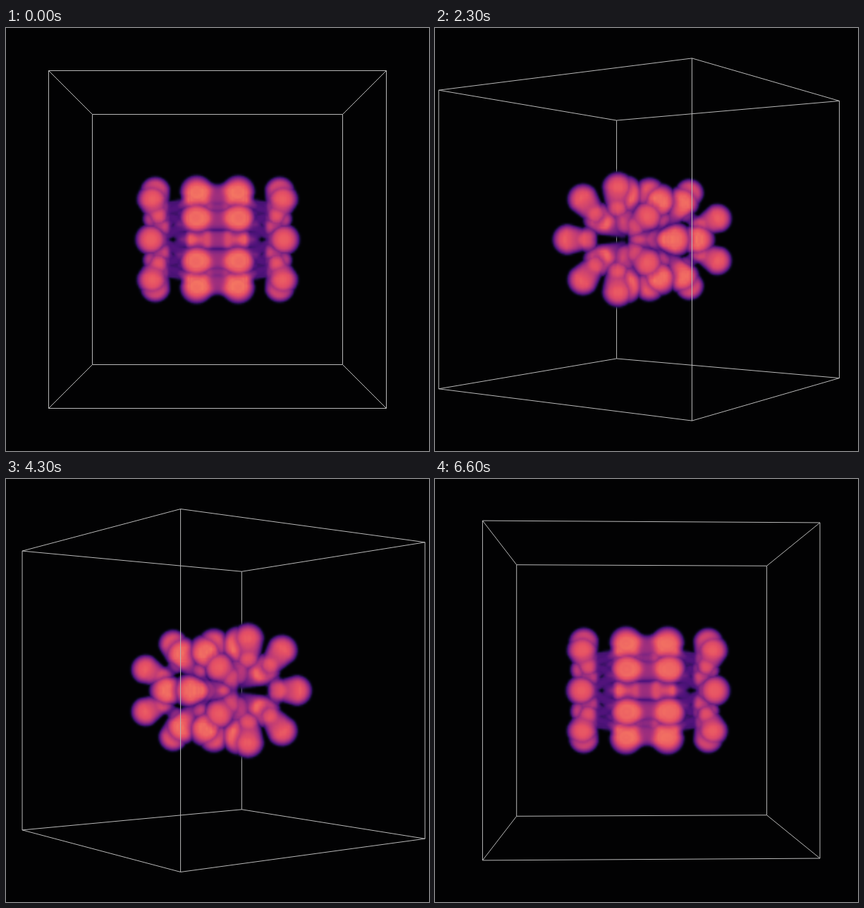
Recreate the animation shown at these times as an HTML page with a canvas. Size 600 by 600 pixels, loop 6700 ms.

```html
<!DOCTYPE html>
<html lang="en">
<head>
<meta charset="utf-8">
<title>Rotating volume</title>
<style>
html, body { margin: 0; width: 100%; height: 100%; overflow: hidden; background: #020203; }
canvas { display: block; }
</style>
</head>
<body>
<canvas id="stage" width="600" height="600"></canvas>
<script>
const ctx = document.getElementById('stage').getContext('2d');
const FRAMES = 67, STEP_MS = 100, TURN = -5.425 * Math.PI / 180;
const DIST = 6.726, FOCAL = 1371.4;   // camera, in half box widths
const A = Math.PI / 7;                // half the angle between neighbouring lobes

// Tapered capsules inside one wedge; points are [x, radius, angle].
const capsule = (p, q, r0, r1, v0, v1) => {
  const at = ([x, r, t]) => [x, r * Math.cos(t), r * Math.sin(t)];
  const a = at(p), b = at(q), d = b.map((v, i) => v - a[i]);
  return { a, d, len: d[0] ** 2 + d[1] ** 2 + d[2] ** 2, r0, r1, v0, v1 };
};
const outerArm = t => capsule([.41, .2, t], [.437, .345, t], .075, .103, .52, .82);
const innerArm = t => capsule([.125, .13, t], [.143, .335, t], .06, .112, .35, .82);
const wisp = t => capsule([.42, .22, t], [.17, .26, A], .05, .055, .36, .36);
const parts = [
  outerArm(0), outerArm(2 * A), innerArm(A), innerArm(-A),
  capsule([.4, .21, 0], [.4, .21, 2 * A], .055, .055, .4, .4),
  capsule([0, .31, A], [.145, .31, A], .085, .09, .55, .55),
  wisp(0), wisp(2 * A)
];
const FLOOR = .13;                    // density that stays invisible

// Sevenfold symmetry about x, mirrored left to right.
function density(x, y, z) {
  const rho = Math.hypot(y, z);
  let t = Math.abs(Math.atan2(y, z)) % (2 * A);
  if (t > A) t = 2 * A - t;
  x = Math.abs(x);
  const u = rho * Math.cos(t), w = rho * Math.sin(t);
  let sum = 0;
  for (const { a, d, len, r0, r1, v0, v1 } of parts) {
    const px = x - a[0], pu = u - a[1], pw = w - a[2];
    const k = Math.max(0, Math.min(1, (px * d[0] + pu * d[1] + pw * d[2]) / len));
    const dist2 = (px - k * d[0]) ** 2 + (pu - k * d[1]) ** 2 + (pw - k * d[2]) ** 2;
    const r = r0 + (r1 - r0) * k;
    const v = (v0 + (v1 - v0) * k) * Math.exp(-((dist2 / (r * r)) ** 2));
    sum += v * v;
  }
  return Math.max(0, Math.min(.85, Math.sqrt(sum)) - FLOOR) / (1 - FLOOR * 1.2);
}

// Sampled density
const CELL = .02, NX = 65, NY = 57, ROW = NX, SLICE = NX * NY;
const HX = (NX - 1) / 2, HY = (NY - 1) / 2;
const grid = new Float32Array(SLICE * NY);
for (let k = 0, i = 0; k < NY; k++)
  for (let j = 0; j < NY; j++)
    for (let h = 0; h < NX; h++)
      grid[i++] = density((h - HX) * CELL, (j - HY) * CELL, (k - HY) * CELL);

function sample(x, y, z) {
  x = x / CELL + HX; y = y / CELL + HY; z = z / CELL + HY;
  if (x < 0 || y < 0 || z < 0 || x >= NX - 1 || y >= NY - 1 || z >= NY - 1) return 0;
  const h = x | 0, j = y | 0, k = z | 0, fx = x - h, fy = y - j, fz = z - k;
  const i = h + j * ROW + k * SLICE;
  const line = n => grid[n] + (grid[n + 1] - grid[n]) * fx;
  const near = line(i), far = line(i + SLICE);
  const a = near + (line(i + ROW) - near) * fy;
  const b = far + (line(i + SLICE + ROW) - far) * fy;
  return a + (b - a) * fz;
}

const RAMP = [[0, 0, 4], [28, 16, 68], [79, 18, 123], [129, 37, 129],
              [181, 54, 122], [229, 80, 100], [251, 135, 97], [254, 194, 135]];
function paint(data, i, v) {
  const s = Math.min(6.99, v * 8), n = s | 0;
  for (let c = 0; c < 3; c++)
    data[i + c] = RAMP[n][c] + (RAMP[n + 1][c] - RAMP[n][c]) * (s - n);
  data[i + 3] = Math.min(1, v * 5) * 255;
}

// Brightest point along each ray, dimmed by what lies in front of it.
const LEFT = 154, TOP = 194, W = 146, H = 106, PX = 2;
const FADE = 4.2, MARCH = .02, REACH = .68;
const layer = document.createElement('canvas');
layer.width = W; layer.height = H;
const lctx = layer.getContext('2d'), image = lctx.createImageData(W, H);

function renderVolume(c, s) {
  for (let row = 0, i = 0; row < H; row++) {
    const dy = (300 - TOP - (row + .5) * PX) / FOCAL;
    for (let col = 0; col < W; col++, i += 4) {
      const dx = (LEFT + (col + .5) * PX - 300) / FOCAL;
      let best = 0, depth = 0;
      for (let z = REACH; z > -REACH; z -= MARCH) {
        const away = DIST - z, x = dx * away;
        const v = sample(x * c - z * s, dy * away, x * s + z * c);
        if (v < .004) continue;
        depth += v * MARCH;
        const light = Math.exp(-FADE * depth);
        if (v * light > best) best = v * light;
        if (light * .86 < best) break;
      }
      paint(image.data, i, best);
    }
  }
  lctx.putImageData(image, 0, 0);
}

// Box edges join corners that differ in one coordinate.
const edges = [];
for (let i = 0; i < 8; i++)
  for (const bit of [1, 2, 4]) if (!(i & bit)) edges.push([i, i | bit]);

function project(i, c, s) {
  const x = i & 1 ? 1 : -1, y = i & 2 ? 1 : -1, z = i & 4 ? 1 : -1;
  const depth = z * c - x * s, scale = FOCAL / (DIST - depth);
  return { x: 300 + (x * c + z * s) * scale, y: 300 - y * scale, depth };
}

function drawEdges(corners, front) {
  ctx.beginPath();
  for (const [i, j] of edges) {
    const p = corners[i], q = corners[j];
    if ((p.depth + q.depth > 0) !== front) continue;
    ctx.moveTo(p.x, p.y);
    ctx.lineTo(q.x, q.y);
  }
  ctx.stroke();
}

function draw(frame) {
  const c = Math.cos(frame * TURN), s = Math.sin(frame * TURN);
  const corners = Array.from({ length: 8 }, (_, i) => project(i, c, s));
  ctx.fillStyle = '#020203';
  ctx.fillRect(0, 0, 600, 600);
  ctx.strokeStyle = '#b8b8b8';
  ctx.lineWidth = 1;
  drawEdges(corners, false);
  renderVolume(c, s);
  ctx.imageSmoothingQuality = 'high';
  ctx.drawImage(layer, LEFT, TOP, W * PX, H * PX);
  drawEdges(corners, true);
}

let shown = -1;
function tick() {
  const frame = Math.floor(performance.now() / STEP_MS) % FRAMES;
  if (frame !== shown) draw(shown = frame);
  requestAnimationFrame(tick);
}
tick();
</script>
</body>
</html>
```
